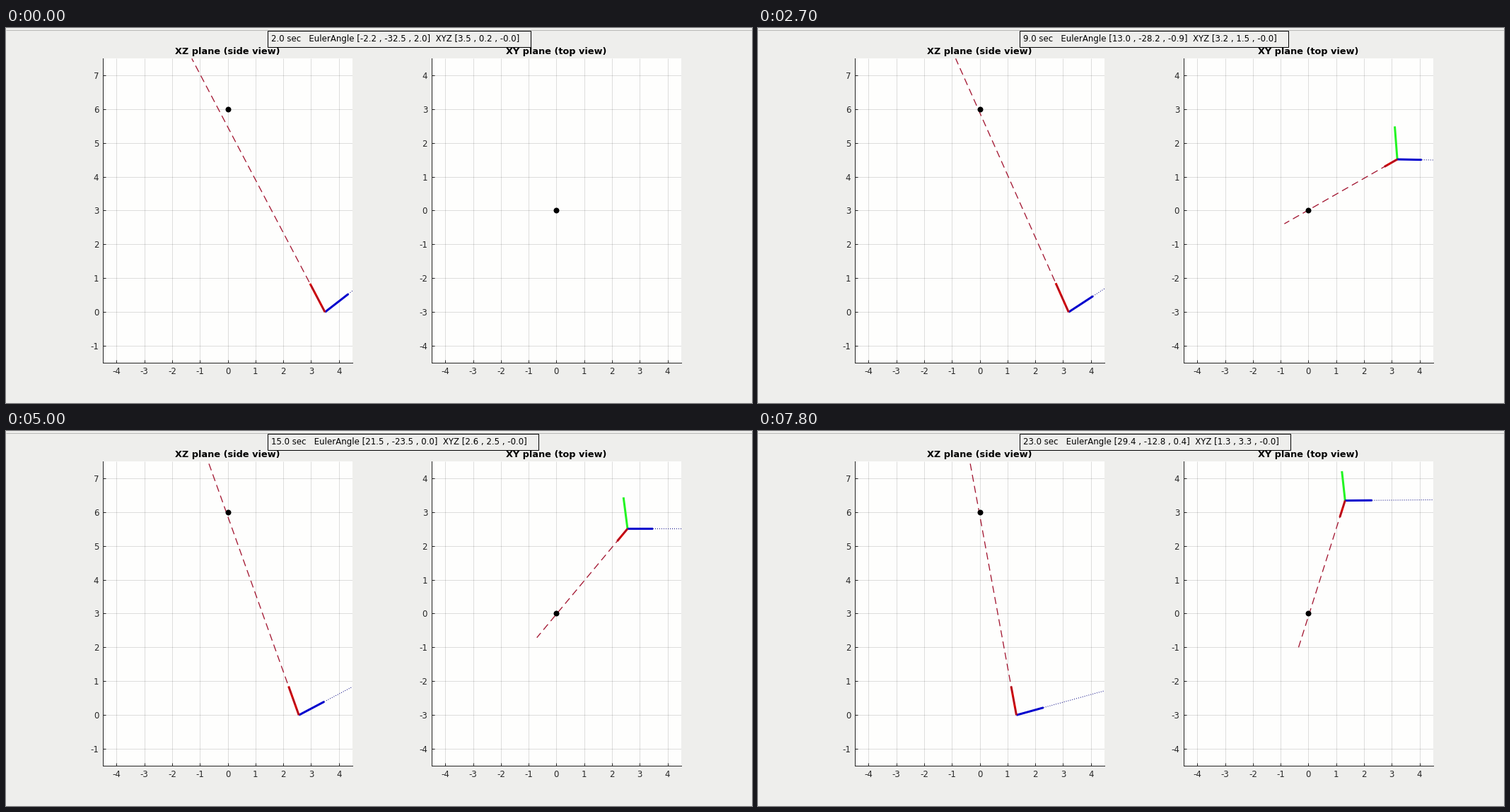
Animation of 1055 by 531 pixels, one loop 8000 ms. Source, as a matplotlib script:

```python
import matplotlib.pyplot as plt
import numpy as np
from matplotlib.animation import FuncAnimation
from matplotlib.patches import Rectangle

W, H, DPI = 1055, 531, 100
PX = 72 / DPI  # one pixel in points
STEP_MS, LOOP_MS = 100, 8000
BG, INK = "#eeeeec", "#262626"
FONT = 11.72 * PX

plt.rcParams.update({
    "font.family": "DejaVu Sans",
    "axes.unicode_minus": False,
    "lines.scale_dashes": False,
    "lines.solid_capstyle": "butt",
    "lines.dash_capstyle": "butt",
})

# The pose advances by one second at each of these times (ms).
TICKS = [1300, 1500, 1800, 2000, 2200, 2500, 2700, 3200, 3700, 4000, 4400,
         4800, 5000, 5400, 5700, 6000, 6500, 6700, 7000, 7400, 7800]
TOP_VIEW_MS = 1000

KEY_T = np.array([2, 3, 7, 11, 15, 18, 23], float)
KEYS = np.array([
    [-2.2, 1.3, 9.7, 16.0, 21.5, 24.9, 29.4],           # roll
    [-32.5, -31.2, -29.3, -27.0, -23.5, -20.0, -12.8],  # pitch
    [2.0, 0.1, -1.1, -0.5, 0.01, 0.2, 0.4],             # yaw
    [3.5, 3.49, 3.34, 3.02, 2.56, 2.13, 1.32],          # x
    [0.17, 0.34, 1.13, 1.88, 2.51, 2.885, 3.345],       # y
])
SLOPES = np.gradient(KEYS, KEY_T, axis=1)


def pose(t):
    """Cubic Hermite interpolation of angles and position."""
    i = min(np.searchsorted(KEY_T, t, side="right") - 1, len(KEY_T) - 2)
    h = KEY_T[i + 1] - KEY_T[i]
    u = (t - KEY_T[i]) / h
    v = (KEYS[:, i] * (1 + 2 * u) * (1 - u) ** 2
         + KEYS[:, i + 1] * u * u * (3 - 2 * u)
         + h * SLOPES[:, i] * u * (1 - u) ** 2
         + h * SLOPES[:, i + 1] * u * u * (u - 1))
    return v[:3], np.array([v[3], v[4], -0.01])


def rotation(angles):
    (cr, cp, cy), (sr, sp, sy) = np.cos(np.radians(angles)), np.sin(np.radians(angles))
    rx = np.array([[1, 0, 0], [0, cr, -sr], [0, sr, cr]])
    ry = np.array([[cp, 0, sp], [0, 1, 0], [-sp, 0, cp]])
    rz = np.array([[cy, -sy, 0], [sy, cy, 0], [0, 0, 1]])
    return rz @ ry @ rx


fig = plt.figure(figsize=(W / DPI, H / DPI), dpi=DPI, facecolor=BG)


class View:
    """One flat projection of the moving frame."""

    def __init__(self, left, title, dims, ylim, target):
        x0, x1, top, bottom = left, left + 353.6, 43.3, 473.5
        ax = fig.add_axes([x0 / W, 1 - bottom / H, (x1 - x0) / W, (bottom - top) / H],
                          facecolor="#fefefd")
        ax.set(xlim=(-4.5, 4.5), ylim=ylim, xticks=range(-4, 5),
               yticks=range(int(np.ceil(ylim[0])), int(ylim[1]) + 1))
        ax.set_axisbelow(True)
        ax.grid(color=INK, alpha=0.15, lw=PX)
        ax.spines[["top", "right"]].set_visible(False)
        ax.spines[["left", "bottom"]].set(color=INK, linewidth=PX)
        ax.tick_params(direction="in", length=4 * PX, width=PX, color=INK,
                       labelcolor=INK, labelsize=FONT)
        ax.tick_params(axis="x", pad=6.8 * PX)
        ax.tick_params(axis="y", pad=5.5 * PX)
        ax.set_title(title, fontsize=12.85 * PX, fontweight="bold", color="black",
                     y=1.0, pad=6.3 * PX)

        def line(color, width, style="-"):
            return ax.plot([], [], color=color, lw=width * PX, ls=style)[0]

        self.dims = dims
        self.axes = [line("#0000cd", 3), line("#22f522", 3), line("#d40000", 3)]
        self.axes[1].set_zorder(1.9)
        self.dots = line("#000080", 1, (0, (1 * PX, 2 * PX)))
        self.ray = line("#a2142f", 1.3, (0, (10 * PX, 6 * PX)))
        ax.plot(*target, "o", color="black", ms=8 * PX, mew=0, zorder=3)

    def show(self, visible):
        for art in [*self.axes, self.dots, self.ray]:
            art.set_visible(visible)

    def draw(self, origin, rot):
        def segment(art, a, b):
            art.set_data(*[[a[d], b[d]] for d in self.dims])

        for art, axis in zip(self.axes, rot.T):
            segment(art, origin, origin + axis)
        x_axis, z_axis = rot[:, 0], rot[:, 2]
        segment(self.dots, origin + x_axis,
                origin + x_axis * (4.5 - origin[0]) / x_axis[0])
        segment(self.ray, origin, origin + z_axis * (7.5 - origin[2]) / z_axis[2])


side = View(136.8, "XZ plane (side view)", (0, 2), (-1.5, 7.5), (0, 6))
top = View(601.6, "XY plane (top view)", (0, 1), (-4.5, 4.5), (0, 0))
side.axes[1].set_visible(False)  # lies behind the red axis

overlay = fig.add_axes([0, 0, 1, 1], zorder=5)
overlay.set(xlim=(0, W), ylim=(H, 0))
overlay.axis("off")
overlay.plot([0, W], [2.5, 2.5], color="#b8b8b6", lw=PX)
box = overlay.add_patch(Rectangle((369.5, 3.5), 371, 23.5, fc=BG, ec="black", lw=PX))
label = overlay.text(375.2, 19, "", fontsize=FONT, color="black", va="baseline")


def update(n):
    ms = n * STEP_MS
    t = 2.0 + np.searchsorted(TICKS, ms, side="right")
    angles, origin = pose(t)
    rot = rotation(angles)
    side.draw(origin, rot)
    top.draw(origin, rot)
    top.show(ms >= TOP_VIEW_MS)

    roll, pitch, yaw = angles
    x, y, z = origin
    label.set_text(f"{t:.1f} sec   EulerAngle [{roll:.1f} , {pitch:.1f} , {yaw:.1f}]"
                   f"  XYZ [{x:.1f} , {y:.1f} , {z:.1f}]")
    right = label.get_window_extent().x1 * W / fig.bbox.width
    box.set_width(round(right + 15) + 0.5 - 369.5)
    return []


anim = FuncAnimation(fig, update, frames=LOOP_MS // STEP_MS, interval=STEP_MS,
                     repeat=True, repeat_delay=0, blit=False)
plt.show()
```
